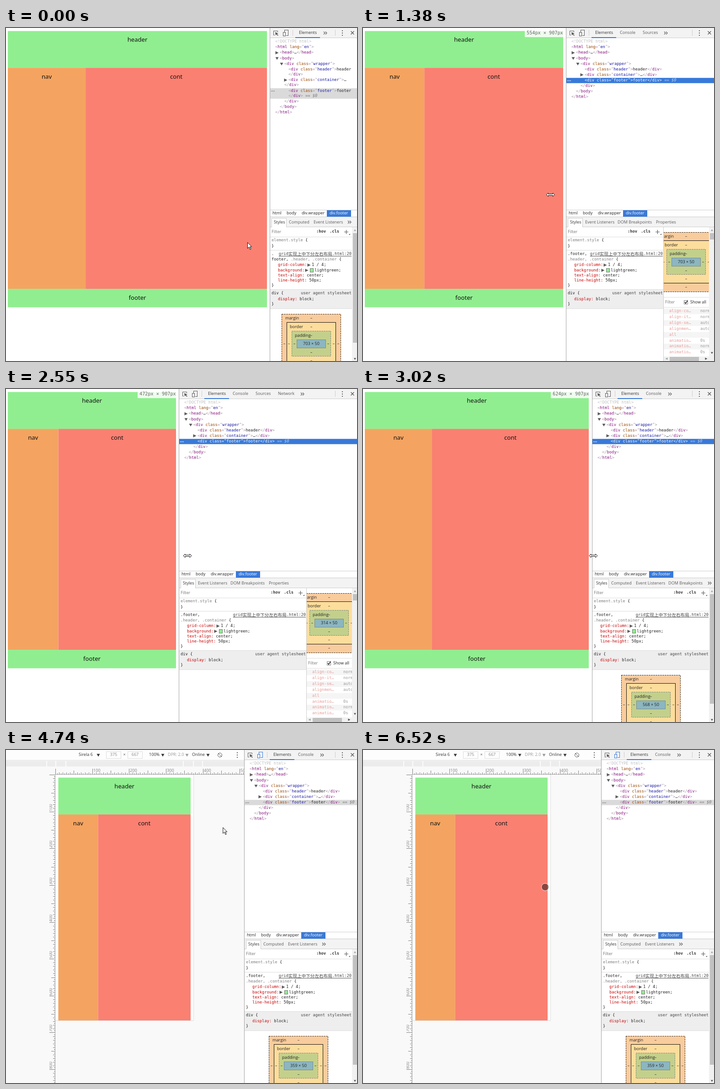
An HTML page with a canvas that plays this animation: 768 by 729 pixels, repeating every 6.58 s.

```html
<!DOCTYPE html>
<html lang="en">
<head>
<meta charset="utf-8">
<title>Responsive grid in developer tools</title>
<style>
html, body { margin: 0; width: 100%; height: 100%; overflow: hidden; background: #fff; }
canvas { display: block; }
</style>
</head>
<body>
<canvas id="stage" width="768" height="729"></canvas>
<script>
const ctx = document.getElementById('stage').getContext('2d');
const LOOP = 6580;
const ZOOM = .8064; // stage pixels per CSS pixel of the shown page
const UI = '9.1px "Open Sans", sans-serif';
const CODE = '8.77px "DejaVu Sans Mono", monospace';
const PAGE = '13.1px "Noto Sans", sans-serif';
const INK = '#222', GREY = '#5a5a5a', RED = '#c80000', BLUE = '#3879d9';

// Bursts of screen updates: first time, last time, number of updates.
const bursts = [[70, 610, 8], [750, 1380, 9], [1460, 1780, 5], [1930, 1930, 1], [2160, 2780, 9],
  [2850, 3480, 9], [3560, 4100, 8], [4420, 5060, 9], [5120, 5370, 4], [5580, 5660, 2],
  [5820, 5970, 3], [6350, 6350, 1], [6520, 6520, 1]];
const dividerKeys = [[670, 577], [907, 530], [1380, 444], [1780, 264], [1930, 262], [2090, 262],
  [2780, 437], [3007, 500.6], [3480, 521]];
const pointerX = [[0, 528], [610, 578], [3480, 521], [3946, 555], [4350, 555], [5060, 408],
  [5370, 400], [5500, 400], [5660, 398]];
const pointerY = [[0, 469], [610, 365], [3480, 365], [3946, 11], [4350, 11], [5060, 299],
  [5500, 299], [5660, 300]];
const scrollKeys = [[5037, 0], [5370, 80], [5745, 80], [5970, 0]];
const boxWidths = [[0, 703], [1460, 530], [2160, 314], [2850, 568], [3400, 633], [4100, 359]];

function settle(t) {
  let time = 0;
  for (const [a, b, n] of bursts) {
    if (t < a) break;
    const step = (b - a) / (n - 1);
    time = t >= b ? b : a + Math.floor((t - a) / step) * step;
  }
  return time;
}

function track(keys, t) {
  if (t <= keys[0][0]) return keys[0][1];
  for (let i = 1; i < keys.length; i++) {
    const [t0, v0] = keys[i - 1], [t1, v1] = keys[i];
    if (t < t1) return v0 + (v1 - v0) * (t - t0) / (t1 - t0);
  }
  return keys[keys.length - 1][1];
}

function rect(x, y, x2, y2, color) {
  ctx.fillStyle = color;
  ctx.fillRect(x, y, x2 - x, y2 - y);
}

function frame(x, y, x2, y2, color, dash = []) {
  ctx.strokeStyle = color;
  ctx.lineWidth = 1;
  ctx.setLineDash(dash);
  ctx.strokeRect(Math.round(x) + .5, y + .5, x2 - x - 1, y2 - y - 1);
  ctx.setLineDash([]);
}

function text(s, x, y, color = INK, font = UI, align = 'left') {
  ctx.font = font;
  ctx.fillStyle = color;
  ctx.textAlign = align;
  ctx.fillText(s, x, y);
  return x + ctx.measureText(s).width;
}

function shape(points, fill, stroke) {
  ctx.beginPath();
  points.forEach(([x, y]) => ctx.lineTo(x, y));
  ctx.closePath();
  if (fill) { ctx.fillStyle = fill; ctx.fill(); }
  if (stroke) { ctx.strokeStyle = stroke; ctx.lineWidth = 1; ctx.stroke(); }
}

function lines(color, width, ...paths) {
  ctx.strokeStyle = color;
  ctx.lineWidth = width;
  ctx.beginPath();
  for (const p of paths) p.forEach(([x, y], i) => i ? ctx.lineTo(x, y) : ctx.moveTo(x, y));
  ctx.stroke();
}

function triangle(x, y, dir, color = '#5c5c5c', r = 3.5) {
  shape({
    right: [[x - r, y - r], [x + r, y], [x - r, y + r]],
    left: [[x + r, y - r], [x - r, y], [x + r, y + r]],
    down: [[x - r, y - r + 1], [x + r, y - r + 1], [x, y + r]],
    up: [[x - r, y + r - 1], [x + r, y + r - 1], [x, y - r]]
  }[dir], color);
}

function clipped(x, y, x2, y2, draw) {
  ctx.save();
  ctx.beginPath();
  ctx.rect(x, y, x2 - x, y2 - y);
  ctx.clip();
  draw();
  ctx.restore();
}

function kebab(x) {
  for (const y of [6, 11, 16]) rect(x - 1, y - 1, x + 1, y + 1, GREY);
}

function chevrons(x, y) {
  lines(GREY, 1.2, ...[0, 4].map(d => [[x + d, y - 3], [x + d + 3, y], [x + d, y + 3]]));
}

// The web page

function page(left, top, width) {
  const right = left + width, split = left + width * .3;
  const block = (label, x, from, x2, to, color) => {
    const y = top + from * ZOOM;
    rect(x, y, x2, top + to * ZOOM, color);
    text(label, (x + x2) / 2, y + 20, '#111', PAGE, 'center');
  };
  block('header', left, 0, right, 100, 'lightgreen');
  block('cont', split, 100, right, 700, 'salmon');
  block('nav', left, 100, split, 700, 'sandybrown');
  block('footer', left, 700, right, 750, 'lightgreen');
}

function device(t) {
  const ready = t >= 4100;
  if (ready) {
    rect(0, 0, 521, 729, '#f9f9f9');
    deviceBar();
    rulers();
  }
  rect(108, 54, 410, 592, '#fff');
  if (ready) lines('#ddd', 1, [[410.5, 54], [410.5, 592.5], [108, 592.5]]);
  const scroll = track(scrollKeys, t);
  clipped(108, 54, 410, 592, () => {
    page(54 + 60.45, 60.45 - scroll, (ready ? 359 : 633) * ZOOM);
    if (t >= 5120 && t < 6520) {
      const y = 57 + scroll * .85;
      rect(405, y, 408, y + 459, t < 6350 ? 'rgba(0,0,0,.36)' : 'rgba(0,0,0,.18)');
    }
  });
}

function deviceBar() {
  rect(0, 0, 521, 22, '#fdfdfd');
  rect(0, 22, 521, 23, '#ddd');
  const menu = (label, x, arrow, color) => {
    text(label, x, 11, color);
    triangle(arrow, 11, 'down', color);
  };
  menu('Sirela 6', 159, 202, '#333');
  menu('100%', 313, 343, '#333');
  menu('DPR: 2.0', 354, 396, '#999');
  menu('Online', 407, 442, '#333');
  for (const [x, label] of [[219, '375'], [266, '667']]) {
    frame(x, 3, x + 33, 19, '#ddd');
    text(label, x + 16.5, 11, '#888', UI, 'center');
  }
  text('×', 259, 11, GREY, UI, 'center');
  ctx.strokeStyle = GREY;
  ctx.lineWidth = 1;
  ctx.beginPath();
  ctx.arc(468, 11, 4.5, 0, 7);
  ctx.stroke();
  lines(GREY, 1, [[464, 7], [472, 15]]);
  kebab(506);
  rect(0, 24, 521, 36, '#ececec');
  for (const x of [88, 108, 130, 387, 409, 429]) rect(x, 24, x + 2, 36, '#fbfbfb');
}

function rulers() {
  const color = '#808080';
  clipped(95, 38, 521, 729, () => {
    rect(108, 53, 521, 54, '#aaa');
    rect(107, 54, 108, 729, '#aaa');
    for (let i = 0; i < 170; i++) {
      const d = Math.round(i * 5 * ZOOM);
      const size = i % 20 === 0 ? 13 : i % 10 === 0 ? 9 : i % 2 ? 3 : 5;
      rect(108 + d, 54 - size, 109 + d, 54, color);
      rect(108 - size, 54 + d, 108, 55 + d, color);
      if (i && i % 20 === 0) {
        text(i * 5, 110 + d, 46, color);
        ctx.save();
        ctx.translate(99, 53 + d);
        ctx.rotate(-Math.PI / 2);
        text(i * 5, 0, 0, color);
        ctx.restore();
      }
    }
  });
}

// Element tree

const PUNCT = '#a894a6', TAG = '#881280';
const open = (tag, attr, value) => [['<', PUNCT], [tag, TAG],
  ...(attr ? [[' ' + attr, '#994500'], ['="', PUNCT], [value, '#1a1aa6'], ['"', PUNCT]] : []), ['>', PUNCT]];
const close = tag => [['</', PUNCT], [tag, TAG], ['>', PUNCT]];
const div = (name, content) => [...open('div', 'class', name), ...(content ? [[content, INK]] : [])];

// Indent, parts, arrow, tail that may wrap, indent of the wrapped tail.
const tree = [
  [12, [['<!DOCTYPE html>', '#c0c0c0']]],
  [12, open('html', 'lang', 'en')],
  [22, [...open('head'), ['…', INK], ...close('head')], 'right'],
  [22, open('body'), 'down'],
  [32, div('wrapper'), 'down'],
  [41, div('header', 'header'), '', close('div'), 41],
  [41, div('container', '…'), 'right', close('div'), 32],
  [41, div('footer', 'footer'), '', [...close('div'), [' == $0', '#777', true]], 41],
  [32, close('div')],
  [22, close('body')],
  [12, close('html')]
];

function elementTree(x, focused, hoverY) {
  const wrap = x > 548;
  let y = 30;
  tree.forEach(([indent, parts, arrow, tail = [], tailIndent], i) => {
    const selected = i === 7, folded = wrap && tail.length;
    const light = selected && focused;
    const write = (list, px) => list.reduce((at, [s, color, italic]) =>
      text(s, at, y, light ? (italic ? '#b9d0f2' : '#fff') : color, (italic ? 'italic ' : '') + CODE), px);
    if (selected) {
      rect(x, y - 5.5, 768, y + (folded ? 17.5 : 6), focused ? BLUE : '#dadada');
      for (const d of [3, 6, 9]) rect(x + d, y, x + d + 1.6, y + 1.6, focused ? '#fff' : '#777');
    } else if (Math.abs(hoverY - y) < 6) {
      rect(x, y - 6, 768, y + 6, 'rgba(56,121,217,.1)');
    }
    if (arrow) triangle(x + indent - 6, y, arrow);
    const end = write(parts, x + indent);
    if (folded) y += 11.3;
    write(tail, folded ? x + tailIndent : end);
    y += 12.1;
  });
}

// Developer tools panel

function toolbar(x, deviceOn) {
  rect(x, 0, 768, 21, '#f3f3f3');
  rect(x, 21, 768, 22, '#ccc');
  lines(GREY, 1, [[x + 17.5, 9], [x + 17.5, 6.5], [x + 8.5, 6.5], [x + 8.5, 15.5], [x + 11, 15.5]]);
  shape([[x + 12, 9], [x + 19, 12], [x + 16, 13], [x + 19, 16], [x + 17.5, 17], [x + 15, 14], [x + 13, 16]], GREY);
  const color = deviceOn ? BLUE : GREY;
  frame(x + 32, 4, x + 41, 17, color);
  rect(x + 29, 9, x + 36, 18, '#f3f3f3');
  frame(x + 29, 9, x + 35, 18, color);
  rect(x + 50, 4, x + 51, 17, '#ccc');
  rect(x + 56, 20, x + 110, 22, BLUE);
  const tabs = [['Elements', 64, 111], ['Console', 118, 160], ['Sources', 168, 208],
    ['Network', 217, 260], ['Performance', 269, 331], ['Memory', 339, 382]];
  let end = 0;
  for (const [label, at, stop] of tabs) {
    if (end && x + stop + 22 > 720) break;
    text(label, x + at, 11, end ? GREY : '#333');
    end = stop;
  }
  chevrons(x + end + 7, 11);
  rect(720, 4, 721, 17, '#ccc');
  kebab(736);
  lines(GREY, 1.4, [[754.5, 7], [761.5, 14]], [[761.5, 7], [754.5, 14]]);
}

function breadcrumbs(x) {
  rect(x, 398, 768, 399, '#ccc');
  rect(x, 413, 768, 414, '#ccc');
  rect(x + 125, 399, x + 178, 413, BLUE);
  text('html', x + 6, 406);
  text('body', x + 37, 406);
  text('div.wrapper', x + 70, 406);
  text('div.footer', x + 131, 406, '#fff');
}

function styleTabs(x, wide) {
  rect(x, 414, 768, 435, '#f3f3f3');
  rect(x, 435, 768, 436, '#ccc');
  rect(x + 4, 416, x + 37, 436, '#fff');
  frame(x + 4, 416, x + 37, 437, '#ccc');
  text('Styles', x + 9, 426, '#333');
  const roomy = 768 - x > 262;
  const tabs = wide
    ? [['Event Listeners', 42], ['DOM Breakpoints', 113], ['Properties', 197]]
    : [['Computed', 42], ['Event Listeners', 96], ...(roomy ? [['DOM Breakpoints', 167]] : [])];
  for (const [label, at] of tabs) text(label, x + at, 426, GREY);
  if (!wide) chevrons(x + (roomy ? 254 : 171), 425);
}

function rules(x, right) {
  const code = (s, at, y, color) => text(s, at, y, color, CODE);
  rect(x, 436, right, 729, '#fff');
  text('Filter', x + 4, 447, '#777');
  text(':hov', right - 78, 446, '#333', 'bold ' + CODE);
  text('.cls', right - 49, 446, '#333', 'bold ' + CODE);
  lines(GREY, 1.2, [[right - 17, 446.5], [right - 8, 446.5]], [[right - 12.5, 442], [right - 12.5, 451]]);
  shape([[right - 4, 450], [right - 4, 453], [right - 7, 453]], GREY);
  rect(x, 457, right, 458, '#ddd');
  code(' {', code('element.style', x + 4, 465, '#808080'), 465);
  code('}', x + 4, 478);
  rect(x, 486, right, 487, '#ddd');

  // The selector flows around the file link.
  const oneLine = right - x > 335, tight = right - x < 209;
  const rest = '.header, .container';
  let end = code(tight ? '.' : '.footer,', x + 4, 494.5);
  if (oneLine) end = code(' ' + rest, end, 494.5, '#808080');
  else {
    end = tight ? code('footer, ', x + 4, 506.5) : x + 4;
    end = code(rest, end, 506.5, '#808080');
  }
  code(' {', end, oneLine ? 494.5 : 506.5);

  const cjk = '9.6px "Noto Sans CJK SC", "Noto Sans CJK", sans-serif';
  let at = right - 1;
  for (const [s, font] of [['.html:20', CODE], ['实现上中下分左右布局', cjk], ['grid', CODE]]) {
    text(s, at, 494.5, '#444', font, 'right');
    at -= ctx.measureText(s).width;
  }
  rect(at, 499, right - 1, 500, '#555');

  const dy = oneLine ? -11.5 : 0;
  code('grid-column:', x + 18, 519 + dy, RED);
  triangle(x + 86, 519 + dy, 'right');
  code('1 / 4;', x + 92, 519 + dy);
  code('background:', x + 18, 530.5 + dy, RED);
  triangle(x + 81, 530.5 + dy, 'right');
  rect(x + 88, 526 + dy, x + 96, 535 + dy, 'lightgreen');
  frame(x + 88, 526 + dy, x + 96, 535 + dy, '#777');
  code('lightgreen;', x + 98, 530.5 + dy);
  code(' center;', code('text-align:', x + 18, 541.5 + dy, RED), 541.5 + dy);
  code(' 50px;', code('line-height:', x + 18, 553 + dy, RED), 553 + dy);
  code('}', x + 4, 564 + dy);
  rect(x, 573 + dy, right, 614 + dy, '#eee');
  rect(x, 572 + dy, right, 573 + dy, '#ddd');
  rect(x, 614 + dy, right, 615 + dy, '#ddd');
  code('div {', x + 4, 581 + dy);
  text('user agent stylesheet', right - 1, 581 + dy, '#444', CODE, 'right');
  code(' block;', code('display:', x + 18, 594 + dy, RED), 594 + dy);
  code('}', x + 4, 605 + dy);
}

function boxModel(cx, top, width) {
  const layer = (half, y, y2, fill, stroke, dash) => {
    rect(cx - half, top + y, cx + half, top + y2, fill);
    frame(cx - half, top + y, cx + half, top + y2, stroke, dash);
  };
  layer(65, 0, 131, '#f9cc9d', '#222', [3, 2]);
  layer(54, 18, 112, '#fddd9b', '#111');
  layer(43, 37, 93, '#c3d08b', '#808080', [3, 2]);
  layer(32, 56, 75, '#8cb6c0', '#7a8c92');
  text('margin', cx - 57, top + 10);
  text('border', cx - 47, top + 29);
  text('padding', cx - 36, top + 47.5);
  text(width + ' × 50', cx, top + 66, INK, UI, 'center');
  for (const y of [10, 29, 47.5, 85, 103, 121]) text('–', cx, top + y, INK, UI, 'center');
  for (const d of [59, 49, 37]) for (const side of [-d, d]) text('–', cx + side, top + 66, INK, UI, 'center');
}

function computedList() {
  rect(657, 589, 757, 590, '#ddd');
  text('Filter', 661, 601, '#777');
  frame(702, 596, 711, 605, '#888');
  lines('#222', 1.5, [[704, 600], [706, 603], [710, 597]]);
  text('Show all', 716, 601);
  rect(657, 611, 757, 612, '#ddd');
  const props = ['align-co… norm', 'align-it… norm', 'align-se… auto', 'alignmen… auto', 'all',
    'animatio… 0s', 'animatio… norm', 'animatio… 0s'];
  props.forEach((row, i) => {
    const y = 620 + i * 12.85, [name, value = ''] = row.split(' ');
    if (i % 2 === 0) rect(658, y - 6, 757, y + 6.5, '#f5f5f5');
    text(name, 670, y, '#e79a96', CODE);
    text(value, 738, y, '#999', CODE);
  });
  rect(658, 719, 757, 729, '#f1f1f1');
  rect(671, 720, 735, 729, '#c1c1c1');
  triangle(664, 724, 'left', '#a3a3a3', 2.5);
  triangle(751, 724, 'right', '#505050', 2.5);
}

function panel(x, t) {
  const wide = x < 450, right = wide ? 657 : 757;
  const deviceOn = t >= 4100;
  const hoverY = t >= 4420 && track(pointerX, t) > x ? track(pointerY, t) : -99;
  const boxWidth = boxWidths.filter(([from]) => t >= from).pop()[1];
  rect(x, 0, 768, 729, '#fff');
  clipped(x, 0, 768, 729, () => {
    toolbar(x, deviceOn);
    elementTree(x, t >= 750 && t < 3940, hoverY);
    breadcrumbs(x);
    styleTabs(x, wide);
    rules(x, right);
    rect(757, 436, 768, 729, '#f1f1f1');
    rect(759, 449, 768, wide ? 463 : 689, '#c1c1c1');
    triangle(763.5, 443, 'up', '#a3a3a3', 2.5);
    triangle(763.5, wide ? 711 : 724, 'down', '#505050', 2.5);
    clipped(wide ? 658 : x, 436, 757, 729, () => {
      boxModel(wide ? 707 : Math.round((x + 758) / 2), wide ? 447 : 626, boxWidth);
      if (wide) computedList();
    });
    if (wide) rect(657, 436, 658, 729, '#ccc');
  });
  rect(x, 0, x + 1, 729, '#a3a3a3');
}

function sizeLabel(x, divider) {
  rect(x - 90, 0, x, 20, 'rgba(255,255,255,.85)');
  text(Math.round(divider * 1.2456 + .7) + 'px × 907px', x - 86, 11, '#666',
    '10.2px "DejaVu Sans Mono", monospace');
}

function tooltip() {
  ctx.globalAlpha = .13;
  frame(530, 24, 720, 44, '#999');
  text('Toggle device toolbar', 540, 34, '#333');
  text('Ctrl + Shift + M', 651, 34, '#333');
  ctx.globalAlpha = 1;
}

// Pointer

function pointer(t) {
  const dragging = t >= 750 && t <= 3480;
  const x = dragging ? track(dividerKeys, t + 75) : track(pointerX, t);
  const y = track(pointerY, t);
  if (dragging || (t <= 610 && x > 573)) {
    const half = [[-9, 0], [-5, -4], [-5, -1.5], [5, -1.5], [5, -4], [9, 0]];
    const mirrored = [[5, 4], [5, 1.5], [-5, 1.5], [-5, 4]];
    shape([...half, ...mirrored].map(([a, b]) => [x + a, y + b]), '#fff', '#111');
  } else if (t > 4420 && x < 410) {
    ctx.beginPath();
    ctx.arc(x + .5, y, 8, 0, 7);
    ctx.fillStyle = 'rgba(0,0,0,.45)';
    ctx.fill();
    ctx.strokeStyle = 'rgba(255,255,255,.6)';
    ctx.lineWidth = 1.3;
    ctx.stroke();
  } else {
    const arrow = [[0, 0], [0, 13], [3, 10], [5.5, 15.5], [7.5, 14.5], [5, 9.5], [9, 9.5]];
    shape(arrow.map(([a, b]) => [x + a + .5, y + b + .5]), '#fff', '#111');
  }
}

function draw() {
  const t = settle(performance.now() % LOOP);
  const divider = track(dividerKeys, t), x = Math.round(divider);
  ctx.textBaseline = 'middle';
  rect(0, 0, 768, 729, '#fff');
  if (t > 4000) device(t);
  else page(4, 6.6, Math.round(divider - 6.4) - 4);
  if (t >= 750 && t <= 3480) sizeLabel(x, divider);
  panel(x, t);
  if (t > 4000 && t < 4100) tooltip();
  pointer(t);
  requestAnimationFrame(draw);
}
draw();
</script>
</body>
</html>
```
